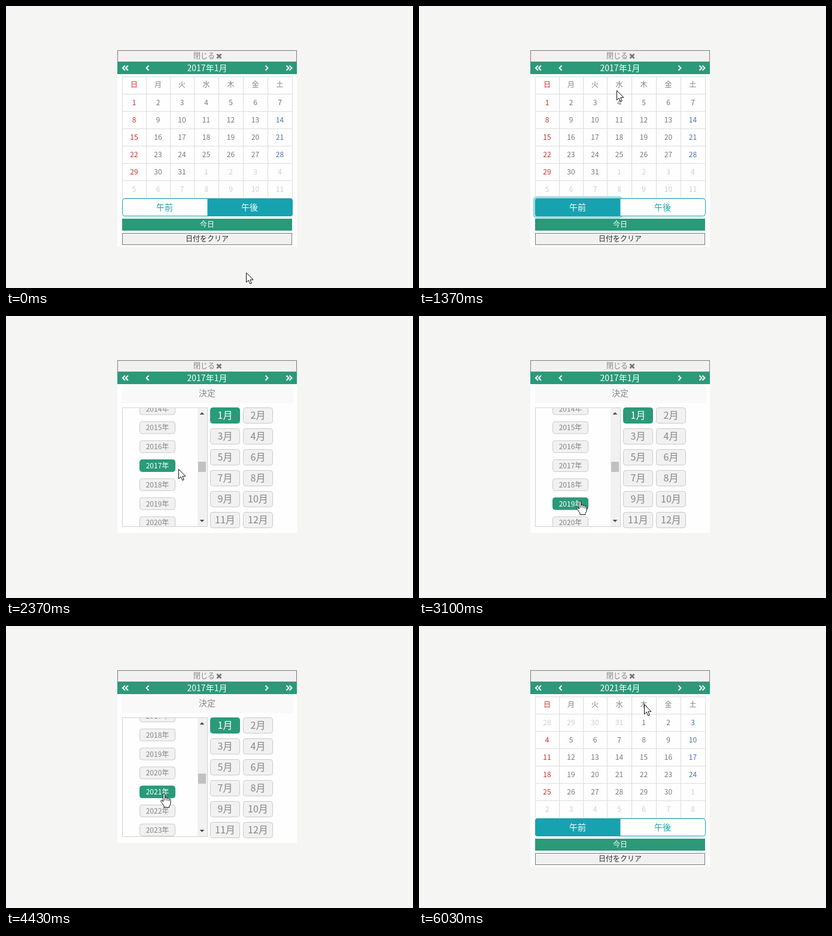
Animation, 680 px wide and 472 px high, one loop 6.06 s. Source, as an HTML page:

```html
<!DOCTYPE html>
<html lang="ja">
<head>
<meta charset="utf-8">
<title>Date picker</title>
<style>
  html, body { margin: 0; width: 100%; height: 100%; overflow: hidden; background: #f5f5f3; }
  svg { display: block; width: 680px; height: 472px; }
  text { font-family: "Noto Sans CJK JP", "Noto Sans CJK", "Noto Sans", sans-serif; text-anchor: middle; }
</style>
</head>
<body>
<svg id="stage" viewBox="0 0 680 472"></svg>
<script>
const LOOP = 6060;
const C = {
  panel: '#fefefe', soft: '#f1f1f1', grey: '#868686', edge: '#7c7c7c', line: '#dcdcdc',
  green: '#2a9a79', teal: '#17a2b0', light: '#ffffff', hover: '#daefe7', btnEdge: '#cacaca',
  red: '#c8322c', blue: '#4c74b4', day: '#7a7a7a', faint: '#cecece'
};
const PITCH = 31.8;
const COLS = [194, 234, 274, 314, 355, 396, 437, 478];

// Moments when something is clicked or scrolled
const AT = { am: 730, open: 1960, year1: 2950, scroll: 3596, year2: 4280, month: 5060, done: 5650 };

// Cursor stops: time, x, y
const PATH = [
  [0, 401, 446], [465, 273, 343], [870, 270, 340], [1560, 343, 96], [2050, 343, 96],
  [2525, 270, 309], [3700, 267, 309], [3860, 267, 309], [4180, 263, 281],
  [4400, 263, 281], [4950, 408, 203], [5200, 408, 203], [5560, 376, 131], [LOOP, 376, 131]
];

const stage = document.getElementById('stage');

function add(parent, tag, attrs = {}) {
  const el = document.createElementNS('http://www.w3.org/2000/svg', tag);
  set(el, attrs);
  parent.appendChild(el);
  return el;
}
function set(el, attrs) {
  for (const k in attrs) el.setAttribute(k, attrs[k]);
}
function show(el, on) {
  el.setAttribute('visibility', on ? 'inherit' : 'hidden');
}
function fillRect(parent, x, y, width, height, fill) {
  return add(parent, 'rect', { x, y, width, height, fill });
}
// One pixel border kept inside the given box
function box(parent, x, y, w, h, fill, stroke, rx = 0) {
  return add(parent, 'rect', { x: x + .5, y: y + .5, width: w - 1, height: h - 1, fill, stroke, rx });
}
function label(parent, x, cy, str, size, fill) {
  const el = add(parent, 'text', { x, y: cy + size * .37, 'font-size': size, fill });
  el.textContent = str;
  return el;
}
function strokes(parent, d, stroke, width) {
  return add(parent, 'path', { d, stroke, fill: 'none', 'stroke-width': width });
}

function buildHead() {
  box(stage, 186, 74, 300, 20, C.soft, C.edge);
  label(stage, 331, 83.5, '閉じる', 12, C.grey);
  strokes(stage, 'M352.5 80.5l7 7m0-7l-7 7', '#747474', 2.6);
  fillRect(stage, 186, 94, 300, 20, C.green);
  const left = x => `M${x} 99.8l-4 4 4 4`;
  const right = x => `M${x} 99.8l4 4-4 4`;
  strokes(stage, left(199) + left(204) + left(238.5) + right(433.5) + right(468.5) + right(473.5), C.light, 2);
  return label(stage, 336, 103.5, '', 14, C.light);
}

function buildDays(parent, year, month) {
  const g = add(parent, 'g');
  const lead = new Date(year, month - 1, 1).getDay();
  for (let i = 0; i < 42; i++) {
    const date = new Date(year, month - 1, 1 - lead + i);
    const col = i % 7;
    const color = date.getMonth() !== month - 1 ? C.faint : col === 0 ? C.red : col === 6 ? C.blue : C.day;
    label(g, (COLS[col] + COLS[col + 1]) / 2, 161.5 + 29 * Math.floor(i / 7), date.getDate(), 12, color);
  }
  return g;
}

function buildCalendar() {
  const g = add(stage, 'g');
  fillRect(g, 186, 114, 300, 289, C.panel);
  let grid = '';
  COLS.forEach((x, i) => { grid += `M${x + .5} 118V322M194 ${118.5 + 29 * i}H479`; });
  strokes(g, grid, C.line, 1);
  [...'日月火水木金土'].forEach((s, i) =>
    label(g, (COLS[i] + COLS[i + 1]) / 2, 132, s, 12, i ? C.grey : C.red));

  const glow = add(g, 'rect', {
    x: 192.5, y: 320.5, width: 146, height: 33, rx: 4, fill: 'none', stroke: '#a2d9de', 'stroke-width': 4
  });
  box(g, 194, 322, 285, 30, C.panel, C.teal, 4);
  const am = add(g, 'path', { d: 'M336.5 322H198a4 4 0 0 0-4 4v22a4 4 0 0 0 4 4H336.5Z', fill: C.teal });
  const pm = add(g, 'path', { d: 'M336.5 322H475a4 4 0 0 1 4 4v22a4 4 0 0 1-4 4H336.5Z', fill: C.teal });
  const amText = label(g, 265, 337, '午前', 14);
  const pmText = label(g, 407, 337, '午後', 14);

  fillRect(g, 194, 356, 284, 20, C.green);
  label(g, 336, 366, '今日', 12, C.light);
  box(g, 194, 380, 284, 20, C.soft, C.edge);
  label(g, 336, 390, '日付をクリア', 12, '#2c2c2c');
  return { g, glow, am, pm, amText, pmText, before: buildDays(g, 2017, 1), after: buildDays(g, 2021, 4) };
}

function button(parent, x, y, w, h, str, size) {
  return {
    x, y, w, h,
    rect: box(parent, x, y, w, h, C.soft, C.btnEdge, 4),
    text: label(parent, x + w / 2, y + h / 2, str, size, C.grey)
  };
}
function paint(b, active, hovered) {
  const lit = active && !hovered;
  set(b.rect, {
    fill: hovered ? C.hover : active ? C.green : C.soft,
    stroke: hovered || active ? C.green : C.btnEdge
  });
  set(b.text, { fill: lit ? C.light : C.grey, 'font-weight': lit ? 500 : 400 });
}

function buildPicker() {
  const g = add(stage, 'g');
  fillRect(g, 186, 114, 300, 249, C.panel);
  fillRect(g, 194, 114, 286, 32, '#f9f9f9');
  label(g, 336, 128.5, '決定', 14, C.grey);
  box(g, 194, 153, 143, 200, C.panel, '#d2d2d2');

  const clip = add(g, 'clipPath', { id: 'view' });
  add(clip, 'rect', { x: 195, y: 154, width: 125, height: 198 });
  const view = add(g, 'g', { 'clip-path': 'url(#view)' });
  const list = add(view, 'g');
  const years = [];
  for (let y = 2013; y <= 2025; y++) {
    years.push({ id: y, ...button(list, 223, 240 + (y - 2017) * PITCH, 60, 21, y + '年', 12) });
  }

  fillRect(g, 320, 154, 16, 198, '#f1f1f1');
  add(g, 'path', { d: 'M323.5 165l4-4 4 4ZM323.5 341l4 4 4-4Z', fill: '#505050' });
  const thumb = fillRect(g, 321, 244, 13, 17, '#c1c1c1');

  const months = [];
  for (let m = 1; m <= 12; m++) {
    const x = m % 2 ? 341 : 396;
    months.push({ id: m, ...button(g, x, 153 + 35 * Math.floor((m - 1) / 2), 50, 27, m + '月', 16) });
  }
  return { g, list, years, months, thumb };
}

function buildCursor() {
  const g = add(stage, 'g', { fill: '#fff', stroke: '#111', 'stroke-width': 1, 'stroke-linejoin': 'round' });
  const arrow = add(g, 'path', { d: 'M.5 .5V16.5L4.2 13L6.8 19L9.3 18L6.8 12.2H12Z' });
  const hand = add(g, 'g');
  add(hand, 'path', {
    d: 'M-1.5 14V2Q-1.5 .5 0 .5T1.5 2V8Q2 6.8 3.3 7T5 8.5Q6 7.3 7.2 8T8.3 9.5Q9.2 8.5 10.2 9.3T11 11V16Q11 19 9 21V23.5H0V21' +
       'L-4.7 14.5Q-5.8 12.5-4.5 11.7T-1.5 14Z'
  });
  add(hand, 'path', { d: 'M1.5 8V12M5 8.5V12.5M8.3 9.5V13', fill: 'none' });
  return { g, arrow, hand };
}

const title = buildHead();
const cal = buildCalendar();
const picker = buildPicker();
const cursor = buildCursor();

const ease = u => u * u * (3 - 2 * u);
const clamp = u => Math.max(0, Math.min(1, u));

function cursorAt(t) {
  const i = Math.max(1, PATH.findIndex(p => p[0] >= t));
  const [t0, x0, y0] = PATH[i - 1], [t1, x1, y1] = PATH[i];
  const k = ease(clamp((t - t0) / (t1 - t0)));
  return [x0 + (x1 - x0) * k, y0 + (y1 - y0) * k];
}
const over = (b, x, y) => x >= b.x && x <= b.x + b.w && y >= b.y && y <= b.y + b.h;

function render(t) {
  const [x, y] = cursorAt(t);
  const done = t >= AT.done;
  const picking = t >= AT.open && !done;
  title.textContent = done ? '2021年4月' : '2017年1月';
  show(cal.g, !picking);
  show(picker.g, picking);

  const clicked = t >= AT.am;
  const amOn = clicked || over({ x: 194, y: 322, w: 142, h: 30 }, x, y);
  show(cal.am, amOn);
  show(cal.pm, !clicked);
  show(cal.glow, clicked && !done);
  set(cal.amText, { fill: amOn ? C.light : C.teal });
  set(cal.pmText, { fill: clicked ? C.teal : C.light });
  show(cal.before, !done);
  show(cal.after, done);

  const u = clamp((t - AT.scroll) / 200);
  const scroll = 100 * ease(u);
  const scrolling = u > 0 && u < 1;
  set(picker.list, { transform: `translate(0 ${-scroll})` });
  set(picker.thumb, { y: 244 + scroll * .03 });

  const year = t < AT.year1 ? 2017 : t < AT.year2 ? 2019 : 2021;
  const month = t < AT.month ? 1 : 4;
  let hand = scrolling;
  for (const b of picker.years) {
    const hit = picking && over(b, x, y + scroll);
    paint(b, b.id === year, hit && !scrolling && b.id !== year);
    hand = hand || hit;
  }
  for (const b of picker.months) {
    const hit = picking && over(b, x, y);
    paint(b, b.id === month, hit);
    hand = hand || hit;
  }
  set(cursor.g, { transform: `translate(${Math.round(x)} ${Math.round(y)})` });
  show(cursor.arrow, !hand);
  show(cursor.hand, hand);
}

const start = performance.now();
function tick() {
  render((performance.now() - start) % LOOP);
  requestAnimationFrame(tick);
}
tick();
</script>
</body>
</html>
```
